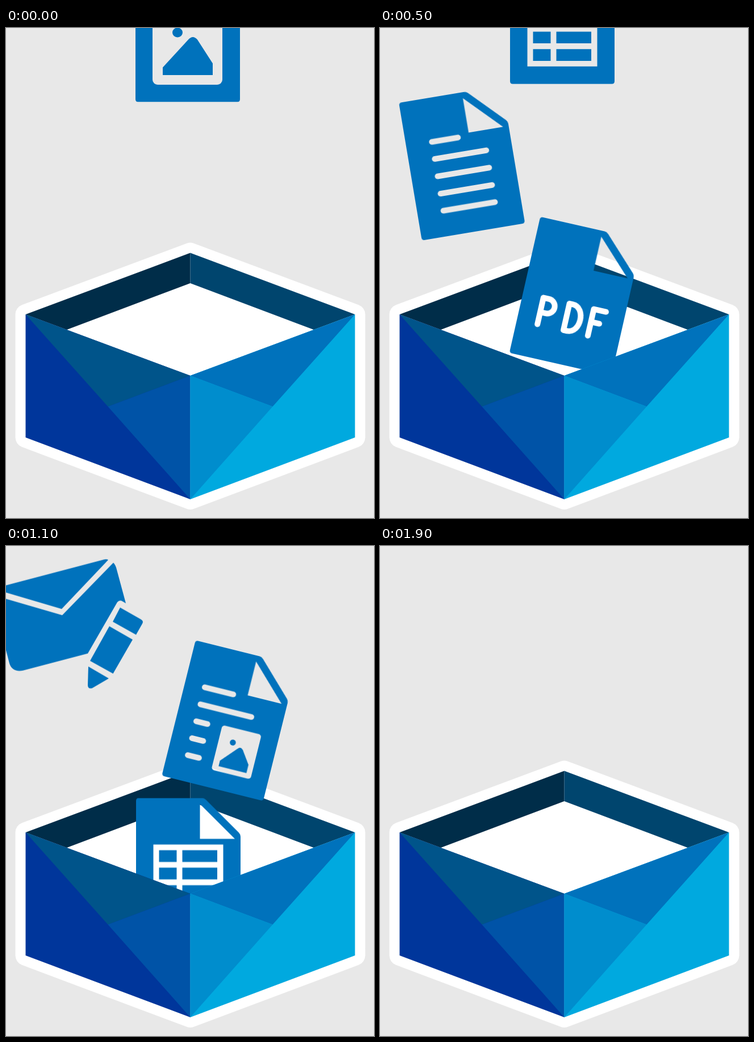
These frames come from a looping animation (648 px wide and 864 px high, 3000 ms). An HTML page:

```html
<!DOCTYPE html>
<html lang="en">
<head>
<meta charset="utf-8">
<title>Files dropping into a box</title>
<style>
  html, body { margin: 0; width: 100%; height: 100%; overflow: hidden; background: #e8e8e8; }
  svg { display: block; width: 100%; height: 100%; }

  /* --dx and --dy: distance covered in each of the 30 steps */
  .drop { fill: #0072bc; animation: drop 3s steps(30) infinite; }
  @keyframes drop {
    from { transform: translate(0, 0); }
    to { transform: translate(calc(30 * var(--dx)), calc(30 * var(--dy))); }
  }
  .image  { --dx: 0px; --dy: 147.5px; }
  .pdf    { --dx: -33px; --dy: 128px; }
  .text   { --dx: 54.2px; --dy: 107.2px; }
  .sheet  { --dx: 0px; --dy: 98.6px; }
  .report { --dx: -26.7px; --dy: 96.4px; }
  .mail   { --dx: 30px; --dy: 74.25px; }

  .line { fill: none; stroke: #000; stroke-width: 10; stroke-linecap: round; stroke-linejoin: round; }
</style>
</head>
<body>
<svg viewBox="0 0 648 864">
  <defs>
    <path id="page" fill="#fff" fill-rule="evenodd"
      d="M5 0H116Q120 0 123 3L181 61Q184 64 184 68V241Q184 246 179 246H5Q0 246 0 241V5Q0 0 5 0ZM112.5 10.5V72H174Z"/>

    <mask id="imageMask">
      <use href="#page"/>
      <rect x="30" y="81" width="123" height="134.5" rx="9"/>
      <g fill="#fff">
        <ellipse cx="74" cy="123.5" rx="9" ry="8.5"/>
        <path d="M48 198.5V185L93 136Q101 127 109 136L136 178V198.5Z"/>
      </g>
    </mask>

    <mask id="pdfMask">
      <use href="#page"/>
      <path class="line" d="M37 186V138H47A13 13 0 0 1 47 164H37M84 138H90C115 138 115 186 90 186H84ZM128 186V138H150M128 161H143"/>
    </mask>

    <mask id="textMask">
      <use href="#page"/>
      <path class="line" d="M46 77.5H92.5M46 108H138M46 139H138M46 170H138M46 200.5H138"/>
    </mask>

    <mask id="sheetMask">
      <use href="#page"/>
      <path d="M30.5 82H153.5V215H30.5Z"/>
      <g id="rows" fill="#fff">
        <path id="row" d="M40.5 92H71.5V112.7H40.5ZM81.5 92H143V112.7H81.5Z"/>
        <use href="#row" y="30.8"/>
        <use href="#row" y="61.6"/>
        <use href="#row" y="92.4"/>
      </g>
    </mask>

    <mask id="reportMask">
      <use href="#page"/>
      <path class="line" d="M35.7 76.5H87.5M35.7 107.4H128M35.7 138.2H56M35.7 169H56M35.7 199.7H56"/>
      <rect x="82" y="133.5" width="71" height="81" rx="5"/>
      <g fill="#fff">
        <circle cx="107.3" cy="159" r="5.3"/>
        <path d="M93 205.5V195.5L118.5 167Q123 162.5 127.5 167.5L143.5 190.5V205.5Z"/>
      </g>
    </mask>

    <clipPath id="opening">
      <path d="M0 0H648V508H614.5L324.5 617L34.5 508H0Z"/>
    </clipPath>
  </defs>

  <!-- back of the box -->
  <path fill="#fff" stroke="#fff" stroke-width="36" stroke-linejoin="round"
    d="M324.5 396.5L614.5 505V722L324.5 831L34.5 722V505Z"/>
  <path fill="#002d49" d="M324.5 396.5L34.5 505L107 532L324.5 450Z"/>
  <path fill="#00456e" d="M324.5 396.5L614.5 505L542 532L324.5 450Z"/>

  <g clip-path="url(#opening)">
    <g class="drop image">
      <rect width="184" height="246" mask="url(#imageMask)" transform="translate(228 -115.5)"/>
    </g>
    <g class="drop pdf">
      <rect width="184" height="246" mask="url(#pdfMask)" transform="translate(447.3 -307.2) rotate(12.8)"/>
    </g>
    <g class="drop text">
      <rect width="184" height="246" mask="url(#textMask)" transform="translate(-237.8 -404) rotate(-9.5)"/>
    </g>
    <g class="drop sheet">
      <rect width="184" height="246" mask="url(#sheetMask)" transform="translate(229 -640.2)"/>
    </g>
    <g class="drop report">
      <rect width="184" height="246" mask="url(#reportMask)" transform="translate(627.5 -894.1) rotate(14)"/>
    </g>
    <g class="drop mail">
      <g transform="translate(-450 -1113.75)">
        <path d="M103 374Q104 371 108 369.5L292 321Q297 319.5 300 321.5L218 408Z"/>
        <path d="M97 383.5L219 419L309 326.5Q312 329 314 335L331 398L325 394.5Q320 391.5 316 396L264 486.5L150 516.5Q131 520 126 504L97 391Q96 387 97 383.5Z"/>
        <path d="M321 405.5L357 426Q363 429 360 434L349 453.5L308 430.5Z"/>
        <path d="M302 438.5L343 462L308.5 522L268 499.5Z"/>
        <path d="M265 509.5L301 530.5L272 547.5Q264 550 264 542Z"/>
      </g>
    </g>
  </g>

  <!-- front of the box -->
  <path fill="#00369b" d="M34.5 505L324.5 613V831L34.5 722Z"/>
  <path fill="#00548a" d="M34.5 505L324.5 613L179.5 667.5Z"/>
  <path fill="#0053a7" d="M324.5 613V831L179.5 667.5Z"/>
  <path fill="#00a9df" d="M614.5 505L324.5 613V831L614.5 722Z"/>
  <path fill="#0072bc" d="M614.5 505L324.5 613L469.5 667.5Z"/>
  <path fill="#008dcd" d="M324.5 613V831L469.5 667.5Z"/>
</svg>
</body>
</html>
```
